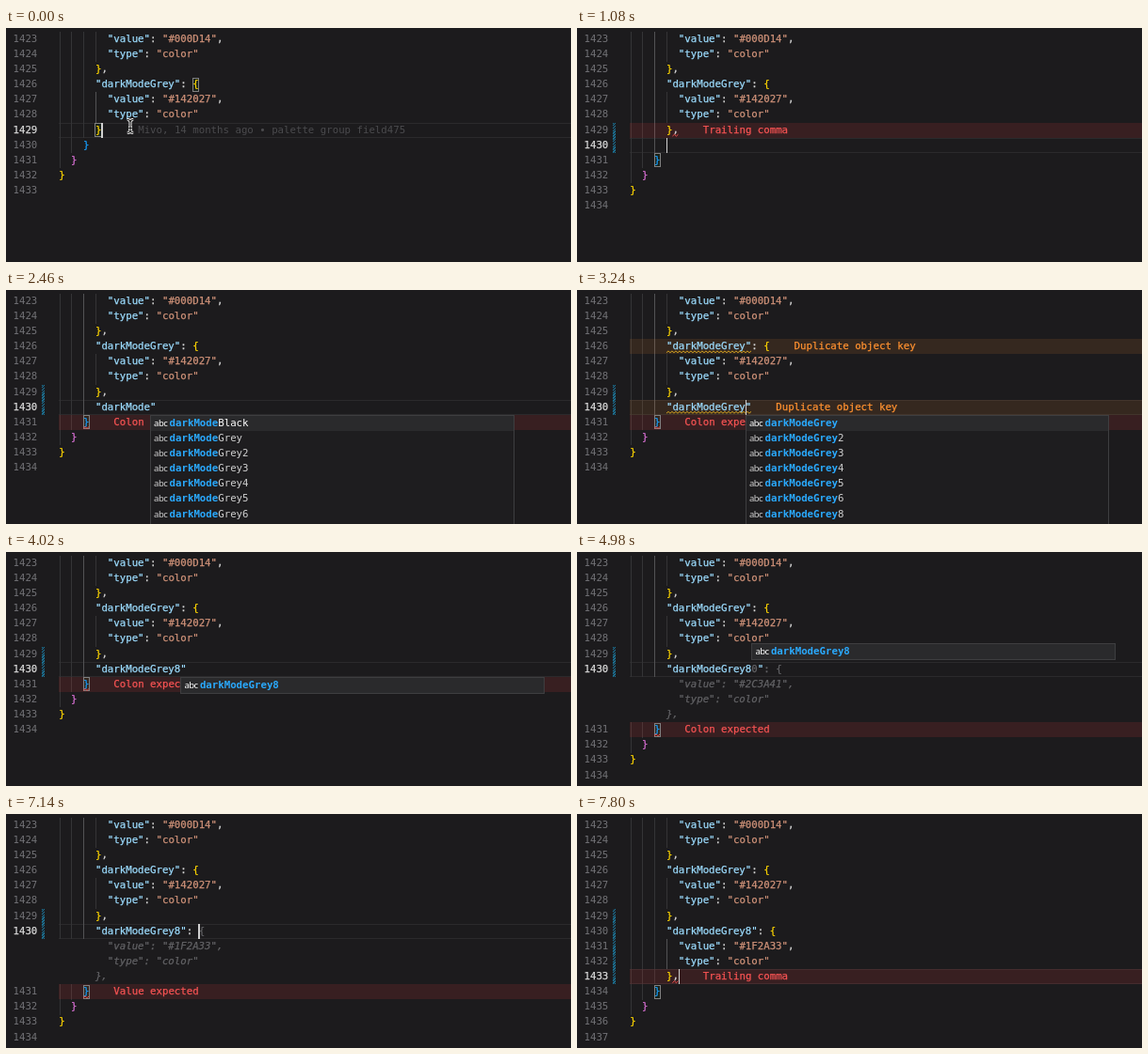
An HTML page that plays this animation: 600 px wide and 249 px high, repeating every 7860 ms.

```html
<!DOCTYPE html>
<html lang="en">
<head>
<meta charset="utf-8">
<title>Editor completion</title>
<style>
html, body { margin: 0; width: 100%; height: 100%; overflow: hidden; background: #1c1b1d; }
#stage { position: relative; width: 600px; height: 249px; overflow: hidden;
  font: 10.73px/16.1px "DejaVu Sans Mono", monospace; color: #d4d4d4; }
#stage div { position: absolute; white-space: pre; box-sizing: border-box; }
.code, .lens, .num.on { -webkit-text-stroke: .25px currentColor; }
.num { left: 7.5px; color: #727276; }
.num.on { color: #d8d8d8; }
.key { color: #9cdcfe; }
.val { color: #ce9178; }
.ghost { color: #626265; }
.ghost.row { font-style: italic; }
.blame { color: #4b4b4e; }
.guide { width: 1px; height: 16.3px; background: #343436; }
.guide.on { background: #525254; }
.line { left: 56px; right: 0; height: 16.1px; border: solid #2b2a2c; border-width: 1px 0; }
.band { left: 56px; right: 0; height: 16.1px; }
.box { width: 7.4px; height: 15px; border: 1px solid #808080; background: #0064001a; }
.diff { left: 38px; width: 3px; background: repeating-linear-gradient(-45deg, #1b7294 0 1px, #1c2c36 1px 2px); }
.caret { width: 1.4px; height: 16.1px; background: #d0d0d0; }
.popup { width: 386.5px; background: #1e1d1f; border: 1px solid #3e3e40; overflow: hidden; }
.item { left: 0; width: 100%; height: 16.1px; color: #d0d0d0; }
.item.on { background: #2a2a2c; color: #fff; }
.item b { color: #2aaaff; }
.item.object b { color: #fff; }
.icon { left: 3px; font: 9.5px/16.1px "Noto Sans", sans-serif; letter-spacing: -.5px; }
.object .icon { letter-spacing: 1px; }
.label { left: 19.5px; }
.hint { right: 10px; font: 10.2px/16.1px "Inter", sans-serif; }
svg { position: absolute; left: 0; top: 0; }
</style>
</head>
<body>
<div id="stage"></div>
<script>
const LOOP = 7860, ROW = 16.13, TOP = 3.8, LEFT = 56.2, CHAR = 6.46;
const X = col => LEFT + col * CHAR;
const Y = row => TOP + row * ROW;

const HEAD = [
  '        "value": "#000D14",', '        "type": "color"', '      },',
  '      "darkModeGrey": {', '        "value": "#142027",', '        "type": "color"'
];
const TAIL = ['    }', '  }', '}', ''];
const WORDS = ['Black', 'Grey', 'Grey2', 'Grey3', 'Grey4', 'Grey5', 'Grey6', 'Grey8'].map(s => 'darkMode' + s);
const BRACES = ['#ffd700', '#da70d6', '#179fff'];
const RED = { ink: '#f65353', wave: '#f14c4c', fill: '#e43c3c24' };
const ORANGE = { ink: '#ff9130', wave: '#d9a520', fill: '#ff942f1c' };

const COMMA = '      },';
const entry = s => [COMMA, '      ' + s];
const trailing = row => ['Trailing comma', row, 7, 1];
const colon = ['Colon expected', 'tail', 4, 1];
const value = ['Value expected', 'tail', 4, 1];
const twice = row => ['Duplicate object key', row, 6, 14];

// Square brackets mark inline suggestion text.
const ghost = (first, hex) => [
  ...entry(first), `[        "value": "${hex}",]`, '[        "type": "color"]', '[      },]'
];

// Each step keeps the previous state and changes the given fields.
const steps = [
  { at: 0, body: ['      }'], caret: [6, 7], boxes: [[3, 22], [6, 6]], idle: true, errors: [], popup: '', active: [6, 4, 5] },
  { at: 360, body: [COMMA], caret: [6, 8], boxes: null, idle: false, active: [4, 0, 20] },
  { at: 600, errors: [trailing(6)] },
  { at: 720, body: entry(''), caret: [7, 6] },
  { at: 1260, body: entry('""'), caret: [7, 7] },
  ...type('', 'darkMode', 1380, 60),
  { at: 1560, errors: [colon] },
  ...type('darkMode', 'Grey', 2640, 120),
  { at: 3180, errors: [twice(3), twice(7), colon] },
  ...type('darkModeGrey', '8', 3420, 60),
  { at: 3600, errors: [colon] },
  { at: 4380, body: ghost('"darkModeGrey8[0]"[: {]', '#2C3A41'), above: true },
  { at: 5040, body: entry('"darkModeGrey8"'), caret: [7, 21], popup: '', above: false },
  { at: 5400, body: entry('"darkModeGrey8":'), caret: [7, 22] },
  { at: 5580, popup: '{}' },
  { at: 5640, errors: [value] },
  { at: 6780, body: entry('"darkModeGrey8": '), caret: [7, 23], popup: '' },
  { at: 6960, body: ghost('"darkModeGrey8": [{]', '#1F2A33') },
  { at: 7380, body: [...entry('"darkModeGrey8": {'), '        "value": "#1F2A33",', '        "type": "color"', COMMA],
    caret: [10, 8], errors: [], active: [6, 8, 9] },
  { at: 7680, errors: [trailing(10)] }
].sort((a, b) => a.at - b.at);

function type(before, text, at, gap) {
  return [...text].map((_, i) => {
    const word = before + text.slice(0, i + 1);
    return { at: at + i * gap, body: entry(`"${word}"`), caret: [7, 7 + word.length], popup: word };
  });
}

const states = [];
for (const step of steps) {
  const last = states.at(-1);
  states.push({ ...last, typed: step.caret ? step.at : last.typed, ...step });
}

const div = (cls, x, y, text = '', css = '') =>
  `<div class="${cls}" style="${x === null ? '' : `left:${x}px;`}top:${y}px;${css}">${text}</div>`;

const indentOf = line => line.match(/^ */)[0].length;
const isGhostRow = line => line[0] === '[';

function paint(line) {
  const brace = BRACES[indentOf(line) / 2 % 3];
  const faint = isGhostRow(line) ? 'ghost row' : 'ghost';
  return line.replace(/\[([^\]]*)\]|((?<=: )"[^"]*")|([{}])|([^{}:,\[\]\s]+)/g, (m, g, val, br) =>
    g ? `<span class="${faint}">${g}</span>`
      : val ? `<span class="val">${m}</span>`
      : br ? `<span style="color:${brace}">${m}</span>`
      : `<span class="key">${m}</span>`);
}

function squiggle(row, col, len, color) {
  const x = X(col), y = Y(row) + 14.5;
  let d = `M${x} ${y}`;
  for (let i = 1; i <= len * CHAR / 2; i++) d += `L${x + i * 2} ${y + (i % 2 ? -1.8 : 0)}`;
  return `<path d="${d}" fill="none" stroke="${color}" stroke-width="1"/>`;
}

function popupHtml({ popup, caret, above }) {
  const object = popup === '{}';
  const items = object ? [popup] : WORDS.filter(w => w.startsWith(popup));
  const rows = items.map((word, i) => {
    const cls = 'item' + (i ? '' : ' on') + (object ? ' object' : '');
    const label = `<b>${popup}</b>${word.slice(popup.length)}`;
    return div(cls, 0, i * ROW, div('icon', null, 0, object ? popup : 'abc') + div('label', null, 0, label) +
      (object ? div('hint', null, 0, 'New object') : ''));
  });
  const height = items.length > 1 ? 200 : 18.1;
  return div('popup', X(caret[1]), above ? Y(7) - 19.6 : Y(8), rows.join(''), `height:${height}px`);
}

const pointer = `<path d="M128.8 97.5q3.2 0 3.2 2.4v9q0 2.4 -3.2 2.4M135.2 97.5q-3.2 0 -3.2 2.4M132 108.9q0 2.4 3.2 2.4M130 106.5h4"`;
const beam = pointer + ' fill="none" stroke="#fff" stroke-width="3"/>' + pointer + ' fill="none" stroke="#111" stroke-width="1.1"/>';

function render(s) {
  const lines = [...HEAD, ...s.body, ...TAIL];
  const tail = HEAD.length + s.body.length;
  const [caretRow, caretCol] = s.caret;
  let back = div('line', null, Y(caretRow)), text = '', marks = '', number = 1423;

  lines.forEach((line, row) => {
    const y = Y(row);
    text += div('code', LEFT, y, paint(line));
    if (isGhostRow(line)) return;
    text += div('num' + (row === caretRow ? ' on' : ''), null, y, number++);
    const [col, from, to] = s.active;
    for (let c = 0; c < indentOf(line); c += 2) {
      const on = c === col && row >= from && row <= to;
      back += div('guide' + (on ? ' on' : ''), X(c) + .3, y);
    }
  });

  for (const [message, place, col, len] of s.errors) {
    const row = place === 'tail' ? tail : place;
    const { ink, wave, fill } = message[0] === 'D' ? ORANGE : RED;
    back += div('band', null, Y(row), '', `background:${fill}`);
    text += div('lens', X(lines[row].length + 4), Y(row), message, `color:${ink}`);
    marks += squiggle(row, col, len, wave);
  }

  for (const [row, col] of s.boxes || [[tail, 4]]) back += div('box', X(col) - .5, Y(row) + .5);

  if (s.idle) {
    text += div('blame', X(13), Y(6), 'Mivo, 14 months ago • palette group field475');
    marks += beam;
  } else {
    const changed = s.body.filter(line => !isGhostRow(line)).length;
    back += div('diff', null, Y(6), '', `height:${changed * ROW}px`);
  }

  return back + text + `<svg width="600" height="249">${marks}</svg>` +
    div('caret', X(caretCol) - .3, Y(caretRow)) + (s.popup ? popupHtml(s) : '');
}

const stage = document.getElementById('stage');
const start = performance.now();
let shown = null;

function tick() {
  const t = (performance.now() - start) % LOOP;
  const state = states.findLast(s => s.at <= t);
  if (state !== shown) {
    stage.innerHTML = render(state);
    shown = state;
  }
  const lit = (t - state.typed) % 1000 < 500;
  stage.querySelector('.caret').style.opacity = lit ? 1 : 0;
  requestAnimationFrame(tick);
}
tick();
</script>
</body>
</html>
```
